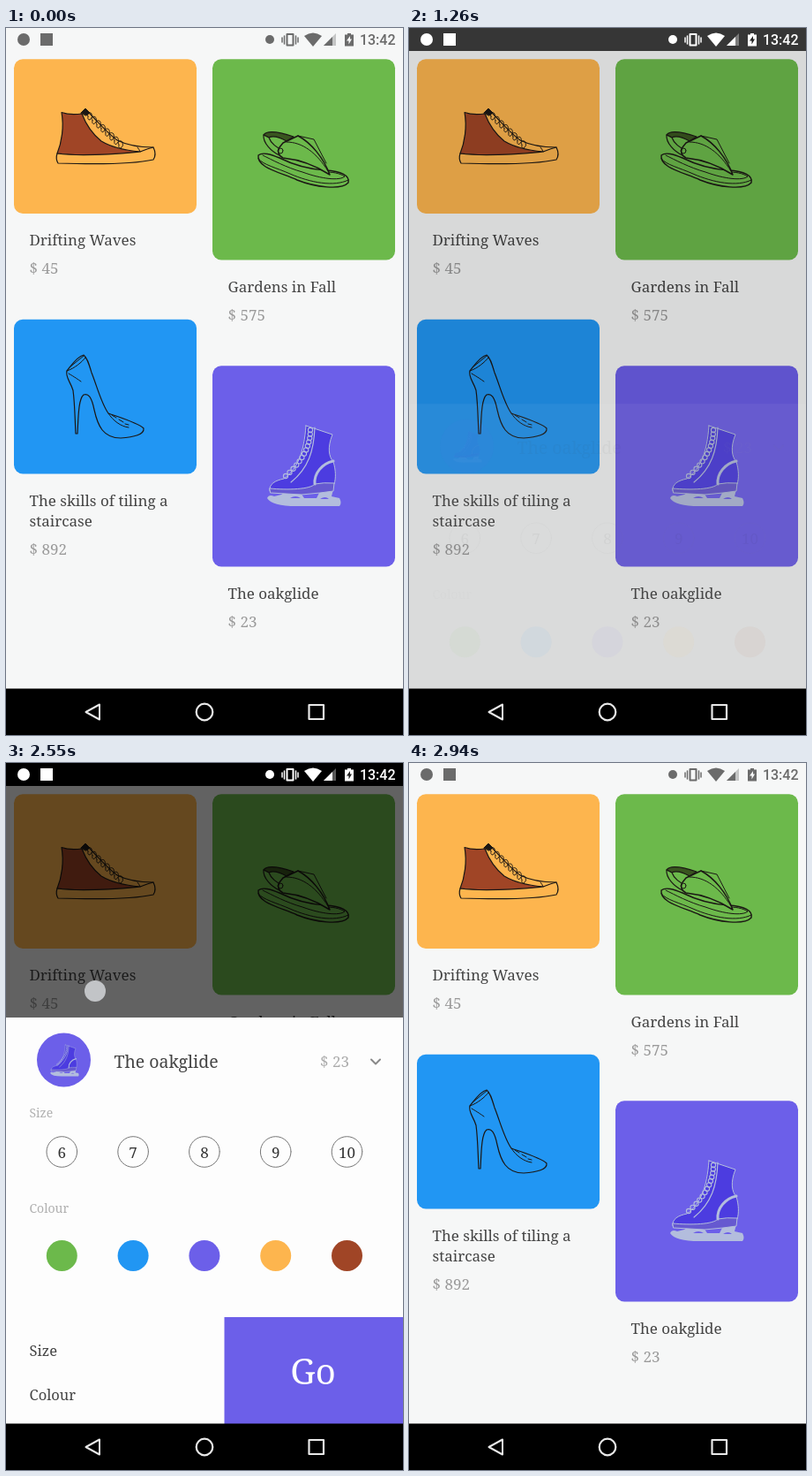
These frames come from a looping animation (450x800 px, 3270 ms). An HTML page with a canvas:

```html
<!DOCTYPE html>
<html lang="en">
<head>
<meta charset="utf-8">
<title>Shop sheet</title>
<style>
html, body { margin: 0; width: 100%; height: 100%; overflow: hidden; background: #000; }
canvas { display: block; width: 450px; height: 800px; }
</style>
</head>
<body>
<canvas id="stage" width="450" height="800"></canvas>
<script>
const ctx = document.getElementById('stage').getContext('2d');
const LOOP = 3270, STEP = 30;
const GREEN = '#6cb94b', BLUE = '#2196f3', PURPLE = '#6c5fe9', ORANGE = '#fdb54e', BROWN = '#a04526';
const INK = '#1b1714', PALE = '#b3bddd';
const SLAB = '"Roboto Slab", "Noto Serif", serif';
const ITEM = 'The oakglide';

const clamp = v => Math.max(0, Math.min(1, v));
const ramp = (t, from, to) => clamp((t - from) / (to - from));
const ease = p => (1 - Math.cos(Math.PI * p)) / 2;

function text(str, x, y, size, color, align = 'left', weight = 400) {
  ctx.font = `${weight} ${size}px ${SLAB}`;
  ctx.textAlign = align;
  ctx.fillStyle = color;
  ctx.fillText(str, x, y);
}

function shape(d, fill, line, width = 1) {
  const p = new Path2D(d);
  if (fill) { ctx.fillStyle = fill; ctx.fill(p); }
  if (line) { ctx.strokeStyle = line; ctx.lineWidth = width; ctx.stroke(p); }
}

function disc(x, y, r, fill, line, width = 1) {
  ctx.beginPath();
  ctx.arc(x, y, r, 0, Math.PI * 2);
  if (fill) { ctx.fillStyle = fill; ctx.fill(); }
  if (line) { ctx.strokeStyle = line; ctx.lineWidth = width; ctx.stroke(); }
}

function rect(x, y, w, h, fill) {
  ctx.fillStyle = fill;
  ctx.fillRect(x, y, w, h);
}

function card(x, y, h, fill) {
  ctx.beginPath();
  ctx.roundRect(x, y, 207, h, 10);
  ctx.fillStyle = fill;
  ctx.fill();
}

function sneaker() {
  shape('M63 95.5C70 98 79 98 86 97C91 110 98 120 108 128C118 134 130 138 152 140C125 144 90 145 58 142C63 130 66 112 63 95.5Z', BROWN, INK, 1.2);
  shape('M94 96C104 106 114 118 126 127C138 133 152 135 167 135', null, INK, 1.1);
  shape('M58 142C90 146 130 142 152 140Q162 136 167 135Q171 143 167 149C140 155 90 154 59 153Q56 148 58 142Z', ORANGE, INK, 1.2);
  shape('M85 96L90 91L95 96L91 99Z', INK, INK);
  for (let i = 0; i < 8; i++) {
    const x = 93 + i * 5, y = 100 + i * 4.6;
    shape(`M${x} ${y}c-3 -4 2 -6 4 -3q2 4 -2 7q-3 0 -2 -4`, null, INK, 0.9);
  }
  shape('M152 140Q151 137 149 135', null, INK);
}

function sandal() {
  shape('M286 144C291 140 300 143 310 147C330 157 346 160 362 161C380 162 390 167 388 175C380 184 350 180 330 172C310 163 284 158 286 144Z', GREEN, INK, 1.4);
  shape('M286 148C292 155 306 158 322 165C345 175 372 180 388 172', null, INK);
  shape('M291 144C301 149 318 158 336 163C358 171 378 173 384 168C378 164 370 163 362 163', null, INK);
  shape('M292 121C296 115 311 118 326 123L318 128C309 123 302 122 298 124Z', '#39551f', INK, 1.3);
  shape('M292 121C291 130 301 140 310 144L315 139C307 136 300 130 298 124Z', GREEN, INK, 1.2);
  shape('M314 130L331 122C346 130 360 147 367 166C350 155 334 149 314 147Q306 143 310 135Z', GREEN, INK, 1.5);
  shape('M318 129C336 129 352 141 365 162M331 122L349 126L363 153', null, INK);
  disc(311, 139, 3, null, INK);
}

function heel() {
  shape('M69 388C74 382 80 372 88 370C92 373 94 380 97 390C103 405 108 425 116 436C130 441 150 447 156 453C157 460 145 463 130 464C110 464 104 450 100 432C97 417 93 413 88 415C82 420 82 440 81 459L79 459C78 440 78 425 76 410C73 400 67 395 69 388Z', null, INK, 1.2);
  shape('M69 388C78 385 86 378 90 373M72 384L88 371M71 391C78 395 82 398 85 400', null, INK);
  shape('M116 436C121 444 130 451 139 452M120 438l5 3m3 2l5 3m2 2l4 1', null, INK);
}

function skate() {
  shape('M296 532Q298 527 304 530L312 528L316 525L334 526L338 532L352 532L356 524L371 522L369 530L378 532Q381 538 378 541L335 541Q302 542 296 532Z', PALE);
  shape('M322 532Q328 528 334 532Z M356 533Q362 529 366 533Z', PURPLE);
  shape('M340 450L370 460C364 475 366 485 371 491C374 500 374 510 372 516C352 525 320 525 299 524C298 516 305 512 315 510C330 500 338 480 340 450Z', '#4c3ce0', PALE);
  shape('M299 521C320 523 345 522 350 516Q360 514 372 515L371 524L356 526L335 528L300 526Z', '#6659d0', PALE);
  shape('M350 516C349 504 358 493 371 490', null, PALE, 3);
  shape('M350 452C349 478 343 498 323 514', null, PALE, 1.2);
  for (let i = 0; i < 13; i++) {
    const p = i / 12;
    disc(345 - 28 * p * p, 455 + 55 * p - 3 * p * p, 2.6, null, PALE, 1.1);
  }
}

function statusIcons(c, cut) {
  disc(20, 13, 7, c);
  rect(39, 6, 14, 14, c);
  disc(299, 13, 5, c);
  ctx.strokeStyle = c;
  ctx.lineWidth = 2;
  ctx.strokeRect(318.5, 7, 7, 12.5);
  shape('M315.5 9V18M313 11V16M328.5 9V18M331 11V16', null, c, 1.5);
  shape('M338 9Q348 2 358 9L348 21Z', c);
  ctx.globalAlpha *= 0.35;
  shape('M360 20L374 6V20Z', c);
  ctx.globalAlpha /= 0.35;
  shape('M360 20L370 10V20Z', c);
  shape('M384 7.5H387V6H391V7.5H394V20.5H384Z', c);
  shape('M390 9L386 14.5H388.5V18.5L392 12.5H390Z', cut);
  ctx.font = '500 16px Roboto, sans-serif';
  ctx.textAlign = 'right';
  ctx.fillStyle = c;
  ctx.fillText('13:42', 441.5, 19);
}

function shop() {
  rect(0, 0, 450, 800, '#f6f7f7');
  card(9, 35.2, 174.8, ORANGE);
  card(234, 35.2, 227.3, GREEN);
  card(9, 329.7, 174.8, BLUE);
  card(234, 382.2, 227.3, PURPLE);
  sneaker();
  sandal();
  heel();
  skate();
  const label = (str, x, y) => text(str, x, y, 17, '#444');
  const price = (str, x, y) => text(str, x, y, 17, '#999');
  label('Drifting Waves', 26.5, 246);
  price('$ 45', 26.5, 278);
  label('Gardens in Fall', 251.5, 298.5);
  price('$ 575', 251.5, 331);
  label('The skills of tiling a', 26.5, 541);
  label('staircase', 26.5, 564);
  price('$ 892', 26.5, 596);
  label(ITEM, 251.5, 645.5);
  price('$ 23', 251.5, 678);
}

function sheet() {
  rect(0, 288, 450, 512, '#fdfdfd');
  disc(65.5, 336, 30.5, PURPLE);
  ctx.save();
  ctx.translate(66.5, 337);
  ctx.scale(0.39, 0.39);
  ctx.translate(-338, -496);
  skate();
  ctx.restore();
  text(ITEM, 122.5, 345, 19.5, '#444');
  text('$ 23', 389, 344, 17, '#aaa', 'right', 500);
  shape('M414 335.5L419 340.5L424 335.5', null, '#888', 2);
  text('Size', 26.5, 400.5, 14, '#b0b0b0');
  text('Colour', 26.5, 509, 14, '#b0b0b0');
  [GREEN, BLUE, PURPLE, ORANGE, BROWN].forEach((c, i) => {
    const x = 63.3 + i * 80.8;
    disc(x, 440, 17.3, null, '#777');
    text(6 + i, x, 446.5, 17, '#333', 'center');
    disc(x, 557.5, 17.5, c);
  });
  text('Size', 26.5, 671, 16.5, '#444');
  text('Colour', 26.5, 721, 16.5, '#444');
  rect(247.5, 627, 202.5, 173, PURPLE);
  text('Go', 348, 703, 40, '#fff', 'center');
}

function navBar() {
  rect(0, 747.5, 450, 52.5, '#000');
  shape('M90.5 774L106 765.5V782.5Z', null, '#e8e8e8', 2);
  disc(225, 774, 9.3, null, '#e8e8e8', 2.2);
  ctx.strokeRect(343.5, 766, 16.5, 16);
}

function tap(t, x, y, from) {
  if (t < from) return;
  const a = 0.72 * (1 - ramp(t, from + 90, from + 240));
  if (a > 0) disc(x, y, 12, `rgba(232,234,238,${a})`);
}

function draw(t) {
  const closing = t >= 2550;
  const shown = closing ? 1 - ease(ramp(t, 2642, 2842)) : ease(ramp(t, 1216, 1416));
  const dim = 0.6 * (closing ? 1 - ramp(t, 2670, 2900) : ease(ramp(t, 1195, 1415)));
  const bar = closing ? 1 - ramp(t, 2670, 2840) : ramp(t, 1200, 1280);

  ctx.globalAlpha = 1;
  shop();
  rect(0, 0, 450, 800, `rgba(0,0,0,${dim})`);
  rect(0, 0, 450, 26, `rgba(0,0,0,${bar})`);
  const lit = bar > 0.55;
  statusIcons(lit ? '#fff' : bar > 0 ? '#333' : '#6b6b6b', lit ? '#222' : '#f7f8f8');

  if (shown > 0) {
    ctx.save();
    ctx.globalAlpha = shown ** 1.4;
    ctx.translate(0, 155 * (1 - shown));
    sheet();
    ctx.restore();
  }
  tap(t, 343, 496, 930);
  tap(t, 101, 258, 2550);
  navBar();
}

const start = performance.now();
function tick() {
  const t = (performance.now() - start) % LOOP;
  draw(Math.floor(t / STEP) * STEP);
  requestAnimationFrame(tick);
}
ctx.lineJoin = ctx.lineCap = 'round';
tick();
</script>
</body>
</html>
```
